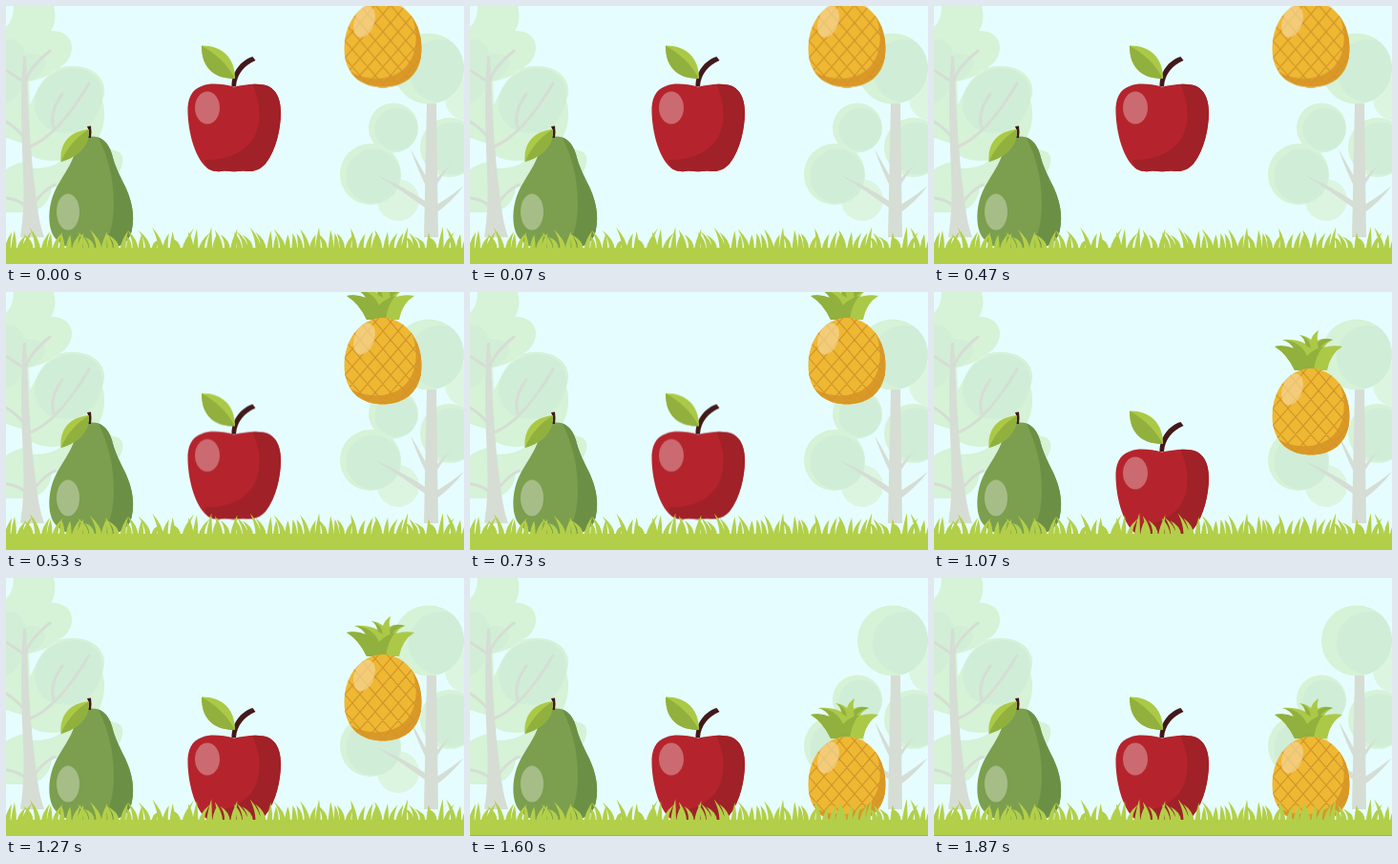
An HTML page that plays this animation: 480x270 px, repeating every 2140 ms.

```html
<!DOCTYPE html>
<html lang="en">
<head>
<meta charset="utf-8">
<title>Falling fruit</title>
<style>
html, body { margin: 0; width: 100%; height: 100%; overflow: hidden; background: #e6fdff; }
svg { display: block; width: 100%; height: 100%; }
.apple, .pineapple, .edge { animation: 2140ms step-end infinite; }
.apple { animation-name: apple; }
.pineapple { animation-name: pineapple; }
.edge { animation-name: edge; }
@keyframes apple {
  0% { transform: translateY(0); }
  24.766% { transform: translateY(64.5px); }
  50%, 100% { transform: translateY(83px); }
}
@keyframes pineapple {
  0% { transform: translateY(-85.5px); }
  24.766% { transform: translateY(-53px); }
  50% { transform: translateY(0); }
  74.766%, 100% { transform: translateY(86px); }
}
@keyframes edge {
  0% { opacity: 0; }
  74.766%, 100% { opacity: 1; }
}
.light { fill: #d6f2d7; }
.mid { fill: #d0edd7; }
.pale { fill: #dcf5e0; }
.wood { fill: #d6ddd5; }
.twig { fill: none; stroke: #d6ddd5; stroke-linecap: round; }
.leaf { fill: #abc947; }
.leaf-dark { fill: #91b03e; }
.stem { fill: #42191a; }
</style>
</head>
<body>
<svg viewBox="0 0 480 270" preserveAspectRatio="none">
  <defs>
    <path id="avocado" d="M90 136.500C80 136.500 75 145 72 154C68 168 58 179 51 194C45 207 44 223 47 234C51 249 67 256 90 256C114 256 129 250 132 234C135 219 132 204 125 189C118 175 114 167 111 155C107 142 100 136.500 90 136.500Z"/>
    <path id="apple" d="M239 84.500C228 82 215 80 206 83.500C194 87 190 98 190.500 111C191 131 197 155 208 167C214 173.500 222 174 229 172.500Q239 174 249 172.500C256 174 265 173 272 165C283 151 288 129 288 111C288 97 283 85 270 82.500C259 80.500 248 83 239 84.500Z"/>
    <path id="pineapple" d="M395 80C373 80 354.500 101 354.500 130C354.500 156 371 170.500 395 170.500C419 170.500 435.500 156 435.500 130C435.500 101 417 80 395 80Z"/>
    <clipPath id="in-avocado"><use href="#avocado"/></clipPath>
    <clipPath id="in-apple"><use href="#apple"/></clipPath>
    <clipPath id="in-pineapple"><use href="#pineapple"/></clipPath>
    <clipPath id="in-treetop"><circle cx="443" cy="65.500" r="37"/></clipPath>
  </defs>
  <rect width="480" height="270" fill="#e6fdff"/>

  <g id="left-tree">
    <path class="light" d="M8 0H50C53 12 51 20 47 26C61 25 69 34 69 43C69 54 62 61 55 65C72 60 88 64 96 72C105 81 104 91 101 99C105 112 103 127 97 138Q104 149 113 151C122 152 124 159 121 168C118 178 106 184 90 180L48 190Q45 213 22 216H0V171Q13 162 25 163V146L0 138V22Q8 14 8 0Z"/>
    <path class="mid" d="M32 91C41 71 62 61 83 67C98 73 104 88 100 101C94 125 76 136 56 132C37 130 25 110 32 91Z"/>
    <path class="mid" d="M0 35Q13 32 21 50Q41 48 42 62Q35 77 19 81Q9 102 0 101Z" opacity=".6"/>
    <path fill="#e6fdff" d="M24 79Q42 76 55 65Q40 73 33 87Q29 96 25 103Z"/>
    <path fill="#e6fdff" d="M0 148Q13 150 18 157Q12 166 0 167ZM27 157Q40 164 59 161Q49 170 27 170Z"/>
    <path class="wood" d="M18 53H21C23 101 25 151 31 196Q34 226 40 242H15Q20 210 18 174C16 130 15 93 18 53Z"/>
    <path class="twig" stroke-width="3" d="M21 78Q25 64 46 47M18 79L0 67M18 136Q8 125 0 121M23 148C49 139 71 108 87 81M50 127Q45 111 59 92M20 209Q12 202 0 201M28 209Q37 194 51 187"/>
  </g>

  <g id="right-tree">
    <circle class="pale" cx="483" cy="97" r="23"/>
    <circle class="light" cx="443" cy="65.500" r="37"/>
    <circle class="mid" cx="455" cy="68" r="33" clip-path="url(#in-treetop)"/>
    <circle class="pale" cx="411" cy="203" r="22"/>
    <circle class="light" cx="406" cy="127.500" r="26"/>
    <circle class="mid" cx="409" cy="129" r="22.500"/>
    <circle class="light" cx="382" cy="176" r="32"/>
    <circle class="mid" cx="385" cy="178" r="28.500"/>
    <circle class="light" cx="465" cy="148" r="31"/>
    <circle class="mid" cx="468" cy="149" r="27.500"/>
    <path class="wood" d="M441 102H451L453 242H438Z"/>
    <path class="wood" d="M442 206Q421 191 387 176Q416 194 442 213ZM442 182Q430 160 424 150Q432 173 442 192ZM450 209Q465 200 480 188Q466 206 450 217ZM450 182L466 165L450 189Z"/>
  </g>

  <g id="fruit">
    <g>
      <use href="#avocado" fill="#7b9f4e"/>
      <path fill="#6b9045" clip-path="url(#in-avocado)" d="M95 134C107 157 113 181 113 207C113 230 107 248 98 258H140V134Z"/>
      <ellipse cx="65" cy="215.500" rx="12" ry="19" fill="#a6bd87"/>
      <path class="stem" d="M85 126L89 125.500Q90 132 89 138H85.500Q88 132 85 126Z"/>
      <path class="leaf" d="M57.500 163C56 143 67 131 87 129C88 145 76 158 57.500 163Z"/>
      <path class="leaf-dark" d="M57.500 163C64 148 74 137 87 129C88 145 76 158 57.500 163Z"/>
    </g>
    <g class="apple">
      <use href="#apple" fill="#b5242d"/>
      <path fill="#a02128" clip-path="url(#in-apple)" d="M256 78C267 97 269 122 259 139C249 154 232 161 208 161L214 180H293V78Z"/>
      <ellipse cx="211" cy="106.500" rx="13" ry="17" fill="#cb6a70"/>
      <path class="stem" d="M236.500 84C236.500 69 246 57 258.500 53L261.500 57C250 62 242 71 241 84Z"/>
      <path class="leaf" d="M205 41.500C225 41 240 53 240 76C220 76 205 67 205 41.500Z"/>
      <path class="leaf-dark" d="M205 41.500C205 67 220 76 240 76C231 60 220 50 205 41.500Z"/>
    </g>
    <g class="pineapple">
      <path class="leaf" d="M378 82Q370 65 357 57Q367 55 377 59Q373 52 365 50Q379 49 389 54Q388 48 383 45Q391 46 395 50Q397 44 403 40Q401 46 402 51Q408 47 418 50Q411 53 409 58Q418 55 428 57Q415 65 412 82Z"/>
      <path class="leaf-dark" d="M378 82Q370 65 357 57Q367 55 377 59Q373 52 365 50Q384 51 391 67Q397 60 408 57Q400 66 398 82Z"/>
      <path class="leaf-dark" d="M390 56Q389 48 383 45Q394 48 395 59ZM402 53Q408 47 418 50Q408 52 403 61Z"/>
      <use href="#pineapple" fill="#eeb833"/>
      <g clip-path="url(#in-pineapple)">
        <path fill="#da9927" d="M415 77C436 106 434 141 412 155C397 164 376 163 361 154L365 177H440V77Z"/>
        <path id="mesh" fill="none" stroke="#d3952a" stroke-width="1.200"/>
      </g>
      <ellipse cx="375.500" cy="102" rx="10.500" ry="17" transform="rotate(20 375.500 102)" fill="#f6d596" opacity=".7"/>
    </g>
  </g>

  <path id="grass" fill="#b3cf49"/>
  <rect class="edge" y="269" width="480" height="1" fill="#a4ad72"/>
</svg>
<script>
const setPath = (id, d) => document.getElementById(id).setAttribute('d', d);

let seed = 17;
const random = () => (seed = seed * 16807 % 2147483647) / 2147483647;

let mesh = '';
for (let x = 283; x < 510; x += 16) {
  mesh += `M${x} 75Q${x + 37} 119 ${x + 87} 175M${x} 75Q${x - 37} 119 ${x - 87} 175`;
}
setPath('mesh', mesh);

// Alternate tall and short blades, leaving narrow gaps above the turf.
let grass = 'M0 253H480V270H0Z';
for (let i = -1; i < 76; i++) {
  const x = i * 6.4 + random() * 2;
  const tip = i % 2 ? 231 + random() * 7 : 236 + random() * 7;
  const lean = (random() - 0.5) * 20;
  grass += `M${x - 3} 255Q${x - 2} 246 ${x + lean} ${tip}Q${x + 3} 245 ${x + 3} 255Z`;
}
setPath('grass', grass);
</script>
</body>
</html>
```
